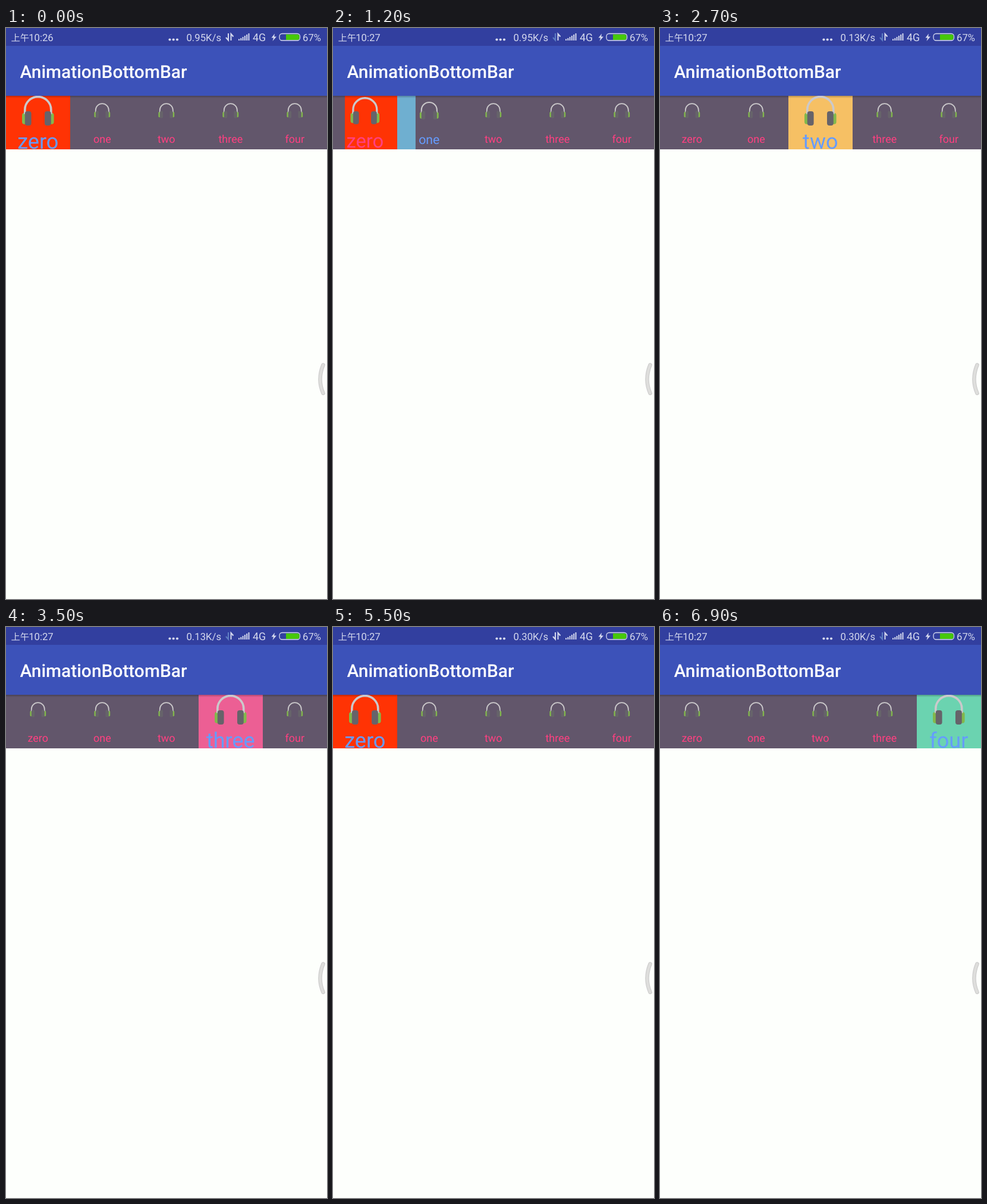
These frames come from a looping animation (540 px wide and 960 px high, 7 s). An HTML page:

```html
<!DOCTYPE html>
<html lang="en">
<head>
<meta charset="utf-8">
<title>AnimationBottomBar</title>
<style>
  html, body { margin: 0; width: 100%; height: 100%; overflow: hidden; background: #fdfffc; }
  svg { display: block; width: 540px; height: 960px; }
  text { font-family: Roboto, "Noto Sans CJK SC", "Noto Sans CJK", sans-serif; text-rendering: geometricPrecision; }
  .status text { font-size: 16.7px; fill: #d5d9ee; }
  .line { fill: none; stroke: #d5d9ee; }
  .tab text { font-size: 18px; text-anchor: middle; }
</style>
</head>
<body>
<svg viewBox="0 0 540 960">
  <defs>
    <linearGradient id="shade" x2="0" y2="1">
      <stop stop-color="#000" stop-opacity=".25"/>
      <stop offset="1" stop-color="#000" stop-opacity="0"/>
    </linearGradient>
    <clipPath id="bar"><rect y="114" width="540" height="90"/></clipPath>
    <g id="phones">
      <rect x="-13.4" y="2" width="4" height="9.5" rx="2" fill="#82b84c"/>
      <rect x="9.4" y="2" width="4" height="9.5" rx="2" fill="#82b84c"/>
      <path d="M-11 3V-.8A11 10.8 0 0 1 11-.8V3" fill="none" stroke="#cbc9cb" stroke-width="1.8"/>
      <rect x="-11" y=".6" width="5.4" height="12" rx="2" fill="#66636a"/>
      <rect x="5.6" y=".6" width="5.4" height="12" rx="2" fill="#66636a"/>
    </g>
  </defs>

  <rect width="540" height="960" fill="#fdfffc"/>
  <rect y="30" width="540" height="84" fill="#3c52b9"/>
  <rect width="540" height="30" fill="#323f9f"/>
  <text x="23.6" y="83.5" font-size="29.9" font-weight="500" fill="#fff">AnimationBottomBar</text>

  <g class="status">
    <text x="8.5" y="21.5" style="font-size:15.3px">上午</text>
    <text id="clock" x="38.2" y="21.5"></text>
    <g fill="#d5d9ee">
      <circle cx="275.5" cy="19.5" r="2.1"/><circle cx="281.7" cy="19.5" r="2.1"/><circle cx="288" cy="19.5" r="2.1"/>
      <path d="M452 9.5L446.5 16.5H450L448.5 22L455 14.5H451.2Z"/>
    </g>
    <text id="speed" x="362" y="21.5" text-anchor="end"></text>
    <path id="down" class="line" d="M374 9V20.5L370 16" stroke-width="2"/>
    <path id="up" class="line" d="M378.5 21V10L382.5 14.5" stroke-width="2"/>
    <path class="line" d="M392 21V18.5M395.3 21V17M398.6 21V15M401.9 21V13M405.2 21V11M408.5 21V9" stroke-width="2"/>
    <text x="415" y="21.5" style="font-size:17.8px">4G</text>
    <rect class="line" x="460" y="9.5" width="34.5" height="11.5" rx="4.5" stroke-width="1.3"/>
    <path d="M471 10.7H490.5Q493.5 10.7 493.5 13.5V17Q493.5 19.9 490.5 19.9H471Z" fill="#46c80a"/>
    <text x="499" y="21.5">67%</text>
  </g>

  <g clip-path="url(#bar)">
    <rect y="114" width="540" height="90" fill="#62566b"/>
    <g id="slider"></g>
    <rect y="114" width="540" height="4" fill="url(#shade)"/>
    <g id="tabs"></g>
  </g>

  <g fill="none" stroke-linecap="round">
    <path d="M533.5 566.5Q523.5 591 533.5 614" stroke="#c9c9c9" stroke-width="6.5"/>
    <path d="M533.5 566.5Q523.5 591 533.5 614" stroke="#dededc" stroke-width="4.5"/>
  </g>
</svg>
<script>
const LOOP = 7000, STEP = 100, W = 108, TOP = 114;
const names = ['zero', 'one', 'two', 'three', 'four'];
const colors = ['#ff3304', '#6fafd0', '#f6c064', '#ec5f94', '#6bd3b0'];
// [start ms, tab that gets selected]
const taps = [[1192, 1], [1992, 2], [2792, 3], [4192, 4], [4992, 0], [5992, 4]];

const $ = id => document.getElementById(id);
function add(parent, tag, attrs) {
  const el = document.createElementNS('http://www.w3.org/2000/svg', tag);
  for (const k in attrs) el.setAttribute(k, attrs[k]);
  return parent.appendChild(el);
}

const tabs = names.map((name, i) => {
  const g = add($('tabs'), 'g', { class: 'tab' });
  const fill = add($('slider'), 'rect', { y: TOP, height: 90, fill: colors[i] });
  const icon = add(g, 'use', { href: '#phones' });
  const label = add(g, 'text', { y: 9.5 });
  label.textContent = name;
  return { fill, icon, label };
});

// Pager scroll: quintic ease-out, 100 ms per page plus 100 ms
function pager(t) {
  let pos = 0, selected = 0;
  for (const [start, to] of taps) {
    if (t < start) break;
    const p = Math.min(1, (t - start) / ((Math.abs(to - selected) + 1) * 100));
    pos = selected + (to - selected) * (1 - (1 - p) ** 5);
    selected = to;
  }
  return { pos, selected };
}

function drawTabs(t) {
  const { pos, selected } = pager(t);
  const page = Math.floor(pos);
  const left = pos * W;
  const right = (page + 1 + Math.sin((pos - page) * Math.PI / 2)) * W;
  tabs.forEach(({ fill, icon, label }, i) => {
    const x0 = Math.max(left, i * W), x1 = Math.min(right, (i + 1) * W);
    fill.setAttribute('x', x0);
    fill.setAttribute('width', Math.max(0, x1 - x0));
    const scale = 1 + Math.max(0, 1 - Math.abs(pos - i));
    const cx = (i + 0.5) * W - 0.2;
    icon.setAttribute('transform', `translate(${cx} 138.8) scale(${scale})`);
    label.setAttribute('transform', `translate(${cx} 183.5) scale(${scale})`);
    label.setAttribute('fill', i === selected ? '#659cff' : '#ff4081');
  });
}

function drawStatus(t) {
  $('clock').textContent = t < 200 ? '10:26' : '10:27';
  $('speed').textContent = t < 1300 ? '0.95K/s' : t < 5200 ? '0.13K/s' : '0.30K/s';
  const downLit = t < 400 || (t >= 5200 && t < 6600);
  const upLit = t < 1700 || t >= 2600;
  $('down').style.stroke = downLit ? '#d5d9ee' : '#5f7fc4';
  $('up').style.stroke = upLit ? '#d5d9ee' : '#5f7fc4';
}

function frame(now) {
  const t = Math.floor(now % LOOP / STEP) * STEP;
  drawTabs(t);
  drawStatus(t);
  requestAnimationFrame(frame);
}
frame(0);
</script>
</body>
</html>
```
